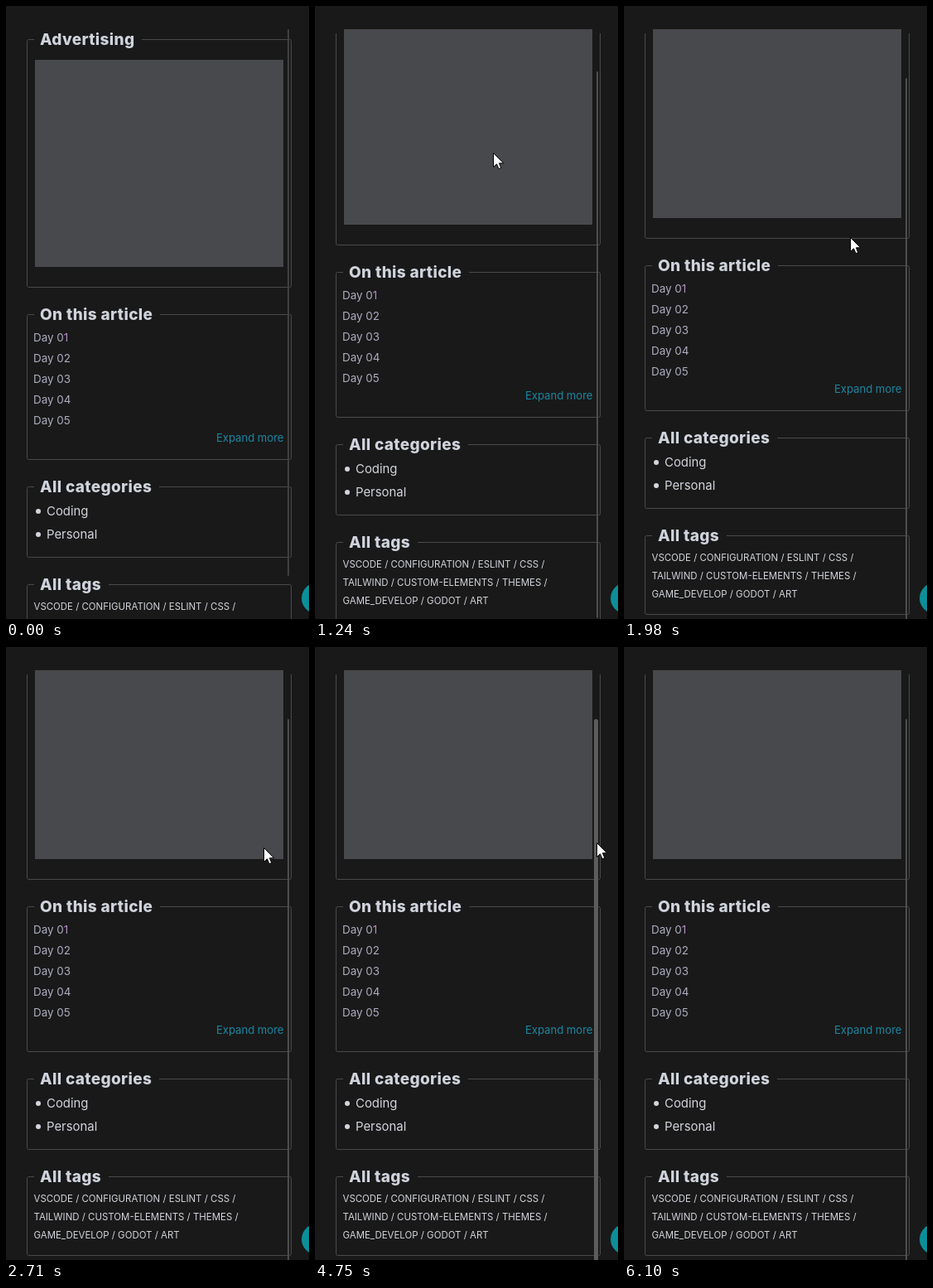
An HTML page that plays this animation: 366 by 740 pixels, repeating every 6.58 s.

```html
<!DOCTYPE html>
<html lang="en">
<head>
<meta charset="utf-8">
<title>Sidebar scroll</title>
<style>
  html, body { margin: 0; width: 100%; height: 100%; overflow: hidden; background: #191919; }
  svg { display: block; width: 366px; height: 740px; font-family: Inter, sans-serif; }
  .frame { fill: none; stroke: #4a4a4b; }
  .title { font-size: 19px; font-weight: 800; letter-spacing: .35px; fill: #cfd3dc; }
  .day { font-size: 13.4px; fill: #adadc0; }
  .day tspan { fill: #b68cc6; }
  .link { font-size: 13.1px; fill: #1b87a2; text-anchor: end; }
  .item { font-size: 14.9px; fill: #d3d5dc; }
  .tag { font-size: 11.45px; fill: #d3d5dc; }
</style>
</head>
<body>
<svg viewBox="0 0 366 740">
  <defs>
    <clipPath id="view"><rect y="28" width="366" height="712"/></clipPath>
    <clipPath id="edges"><rect y="33" width="366" height="707"/></clipPath>
  </defs>
  <rect width="366" height="740" fill="#191919"/>
  <g clip-path="url(#edges)"><g id="frames"></g></g>
  <g clip-path="url(#view)"><g id="content">
    <rect x="35" y="65" width="300" height="250" fill="#48494c"/>
  </g></g>
  <rect id="thumb" height="660"/>
  <circle cx="375.5" cy="715" r="18.5" fill="#0c8f99"/>
  <path id="cursor" d="M0 0V17L4 13.3L6.5 19.2L9.3 18L6.9 12.3H12.2Z" fill="#fff" stroke="#000" stroke-linejoin="round"/>
</svg>
<script>
const LOOP = 6580, SCROLL = 59;
const ENTER = 130, EXIT = 6100;
const $ = id => document.getElementById(id);
const content = $('content'), frames = $('frames'), thumb = $('thumb'), cursor = $('cursor');

function set(el, attrs) {
  for (const k in attrs) el.setAttribute(k, attrs[k]);
  return el;
}
function add(parent, tag, attrs, text) {
  const el = set(document.createElementNS('http://www.w3.org/2000/svg', tag), attrs);
  if (text) el.textContent = text;
  return parent.appendChild(el);
}
const label = (cls, x, y, text) => add(content, 'text', { class: cls, x, y }, text);

// Bordered panel whose top edge is interrupted by its title
function panel(title, top, height) {
  const bottom = top + height;
  const text = label('title', 41, top + 6, title);
  const gapEnd = Math.round(41 + text.getComputedTextLength() + 9);
  const d = `M34 ${top}H27.5Q25.5 ${top} 25.5 ${top + 2}V${bottom - 2}Q25.5 ${bottom} 27.5 ${bottom}` +
    `H342.5Q344.5 ${bottom} 344.5 ${bottom - 2}V${top + 2}Q344.5 ${top} 342.5 ${top}H${gapEnd}`;
  add(frames, 'path', { class: 'frame', d });
}

panel('Advertising', 40.5, 299);
panel('On this article', 372.5, 175);
panel('All categories', 580.5, 85);
panel('All tags', 698.5, 95);

for (let i = 1; i <= 5; i++) {
  const day = label('day', 33, 380 + 25 * i, 'Day 0');
  add(day, 'tspan', i > 1 ? { style: 'fill: inherit' } : {}, String(i));
}
label('link', 335.5, 526, 'Expand more');
['Coding', 'Personal'].forEach((name, i) => {
  add(content, 'circle', { cx: 39, cy: 610 + 28 * i, r: 3, fill: '#d3d5dc' });
  label('item', 49, 615 + 28 * i, name);
});
['VSCODE / CONFIGURATION / ESLINT / CSS /',
 'TAILWIND / CUSTOM-ELEMENTS / THEMES /',
 'GAME_DEVELOP / GODOT / ART'
].forEach((line, i) => label('tag', 33.5, 729 + 22 * i, line));

// Pointer turning points: time, x, y
const path = [
  [ENTER, 254, 715], [540, 14, 430], [890, 144, 126], [1370, 223, 197], [1640, 223, 197],
  [2000, 275, 282], [2240, 284, 264], [2710, 311, 242], [3670, 340, 210],
  [5350, 340, 246], [5490, 340, 246], [EXIT, 345, 740]
];
const clamp = v => Math.max(0, Math.min(1, v));

function slope(i, k) {
  const a = path[i - 1], b = path[i], c = path[i + 1];
  if (!a || !c || a[k] === b[k] || b[k] === c[k]) return 0;
  return (c[k] - a[k]) / (c[0] - a[0]);
}

// Smooth curve through the turning points
function along(t, k) {
  let i = 0;
  while (i < path.length - 2 && t >= path[i + 1][0]) i++;
  const a = path[i], b = path[i + 1], h = b[0] - a[0], u = clamp((t - a[0]) / h), v = 1 - u;
  return a[k] * (1 + 2 * u) * v * v + b[k] * u * u * (3 - 2 * u) +
    h * u * v * (slope(i, k) * v - slope(i + 1, k) * u);
}

// Growing sideways swings that leave the scrollbar and return to it
function swing(t) {
  const p = (t - 3670) / 1620;
  return p > 0 && p < 1 ? 42 * p * Math.sin(3 * Math.PI * p) ** 2 : 0;
}

function draw(t) {
  const scroll = Math.round(SCROLL * (1 - Math.pow(1 - clamp((t - 920) / 520), 2.1)));
  const shift = { transform: `translate(0 ${-scroll})` };
  set(content, shift);
  set(frames, shift);

  const x = along(t, 1) - swing(t), y = along(t, 2);
  const wide = clamp((6 - Math.abs(x - 339)) / 4);
  const w = 2 + 3 * wide;
  const shade = t < 850 ? 64 : Math.round(78 + 14 * wide);
  set(thumb, { x: 342 - w, y: 28 + scroll, width: w, rx: w / 2, fill: `rgb(${shade},${shade},${shade})` });

  set(cursor, {
    visibility: t >= ENTER && t < EXIT ? 'visible' : 'hidden',
    transform: `translate(${Math.round(x) + .5} ${Math.round(y) + .5})`
  });
}

const start = performance.now();
function tick() {
  draw((performance.now() - start) % LOOP);
  requestAnimationFrame(tick);
}
tick();
</script>
</body>
</html>
```
